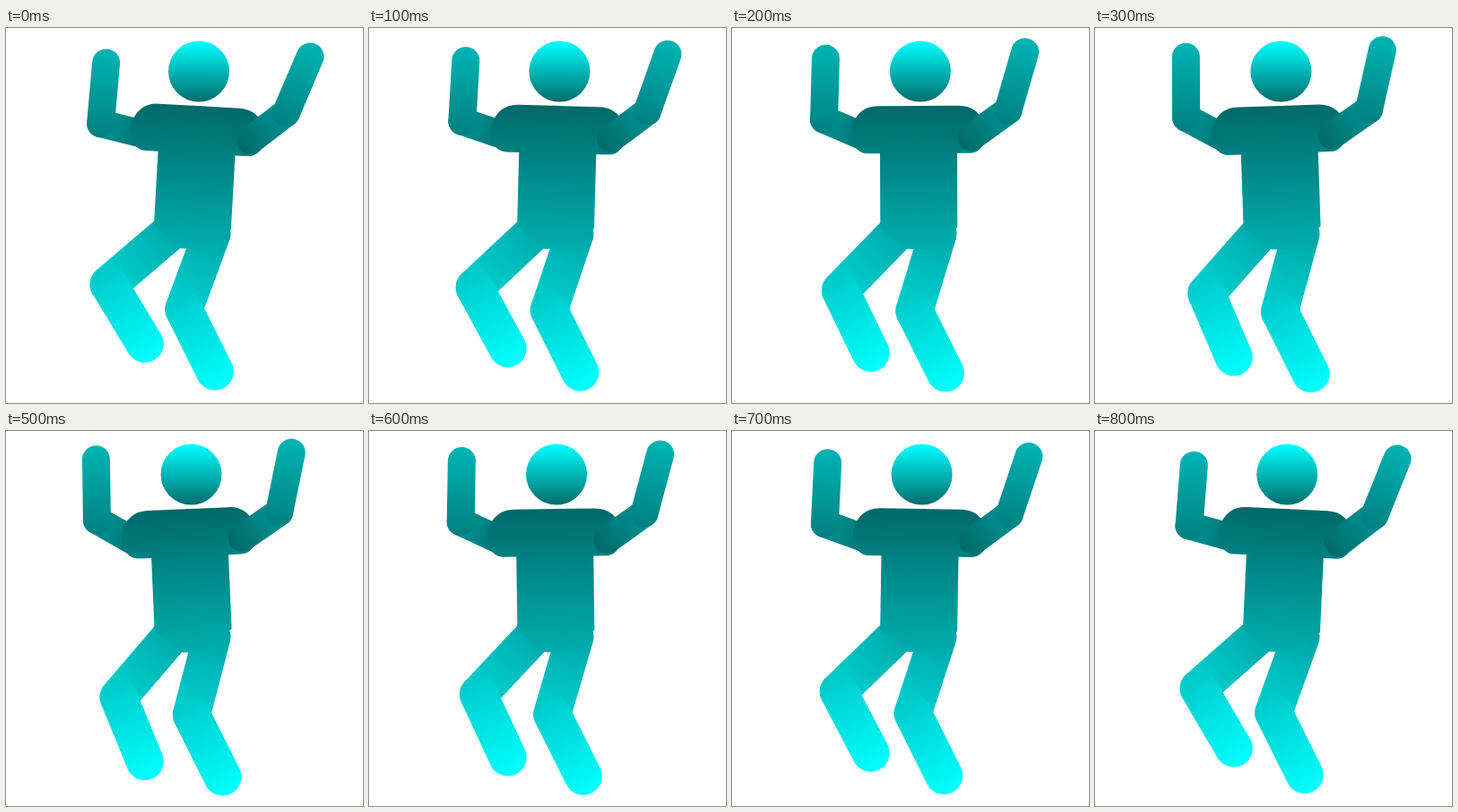
An HTML page with a canvas that plays this animation: 398 px wide and 419 px high, repeating every 0.9 s.

```html
<!DOCTYPE html>
<html>
<head>
<meta charset="utf-8">
<title>Dancing figure</title>
<style>
html, body { margin: 0; width: 100%; height: 100%; overflow: hidden; background: #fff; }
canvas { display: block; }
</style>
</head>
<body>
<canvas id="stage" width="398" height="419"></canvas>
<script>
const ctx = document.getElementById('stage').getContext('2d');
const LOOP = 900, STEP = 100, SWAY = 833;
const WAIST = { x: 208.3, y: 215 };

const rad = degrees => degrees * Math.PI / 180;
const teal = v => `rgb(0,${v},${v})`;

function shade(x0, y0, x1, y1, from, to) {
  const gradient = ctx.createLinearGradient(x0, y0, x1, y1);
  gradient.addColorStop(0, teal(from));
  gradient.addColorStop(1, teal(to));
  return gradient;
}

// Draws a rounded bone and returns its far end; angles turn from straight down.
function bone({ x, y }, length, degrees, width, from, to) {
  const dx = Math.sin(rad(degrees)), dy = Math.cos(rad(degrees));
  const r = width / 2;
  const end = { x: x + dx * length, y: y + dy * length };
  ctx.strokeStyle = shade(x - dx * r, y - dy * r, end.x + dx * r, end.y + dy * r, from, to);
  ctx.lineWidth = width;
  ctx.lineCap = 'round';
  ctx.beginPath();
  ctx.moveTo(x, y);
  ctx.lineTo(end.x, end.y);
  ctx.stroke();
  return end;
}

function leg(hip, thighLength, thighAngle, shinAngle) {
  const knee = bone(hip, thighLength, thighAngle, 42, 158, 218);
  bone(knee, 77.5, shinAngle, 42, 200, 258);
}

function arm(side, tilt, upperAngle, foreAngle) {
  const sin = Math.sin(tilt), cos = Math.cos(tilt);
  const shoulder = {
    x: WAIST.x + side * 59 * cos + 93 * sin,
    y: WAIST.y + side * 59 * sin - 93 * cos
  };
  const elbow = bone(shoulder, 50.5, upperAngle, 31, 105, 158);
  bone(elbow, 68, foreAngle, 31, 128, 180);
}

function torso(tilt) {
  ctx.save();
  ctx.translate(WAIST.x, WAIST.y);
  ctx.rotate(tilt);
  ctx.fillStyle = shade(0, -128, 0, 32, 105, 174);
  // Mirrored halves overlap slightly in the middle.
  for (const side of [-1, 1]) {
    ctx.save();
    ctx.scale(side, 1);
    ctx.beginPath();
    ctx.moveTo(-2, -128);
    ctx.lineTo(45, -128);
    ctx.quadraticCurveTo(68, -128, 75, -103);
    ctx.lineTo(75, -92);
    ctx.quadraticCurveTo(70, -75, 57, -75);
    ctx.lineTo(43, -75);
    ctx.lineTo(43, 8);
    ctx.lineTo(12, 32);
    ctx.lineTo(-2, 32);
    ctx.fill();
    ctx.restore();
  }
  ctx.restore();
}

function head(x, y, r) {
  ctx.fillStyle = shade(x, y - r, x, y + r, 255, 108);
  ctx.beginPath();
  ctx.arc(x, y, r, 0, Math.PI * 2);
  ctx.fill();
}

function draw(lean) {
  const tilt = rad(3.2 - 5.7 * lean);
  ctx.clearRect(0, 0, 398, 419);
  leg({ x: 189.5, y: 222.5 }, 98.5, -49.5 + 9 * lean, 31.2 - 9 * lean);
  leg({ x: 229.5, y: 230 }, 90, -20.3 + 5.7 * lean, 26.5);
  arm(-1, tilt, -103.9 - 15.7 * lean, 174.9 + 5.9 * lean);
  torso(tilt);
  arm(1, tilt, 127.6 - 2.8 * lean, 157 + 11.5 * lean);
  head(215 - 8.5 * lean, 48.5, 34);
}

function frame() {
  const t = Math.floor(performance.now() % LOOP / STEP) * STEP;
  draw(0.003 * Math.min(t, SWAY - t));
  requestAnimationFrame(frame);
}
frame();
</script>
</body>
</html>
```
